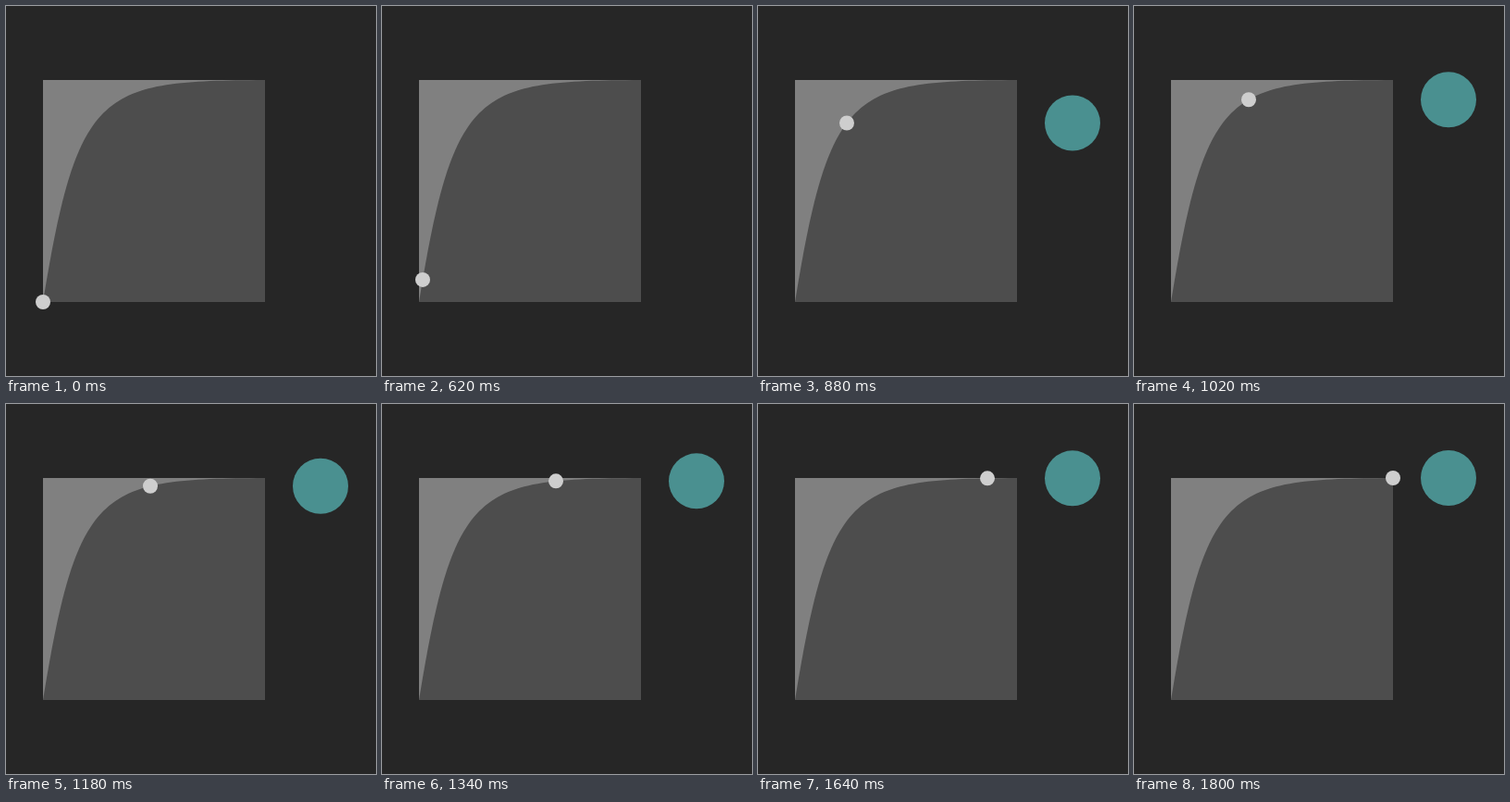
An HTML page with a canvas that plays this animation: 400 by 400 pixels, repeating every 2420 ms.

```html
<!DOCTYPE html>
<html lang="en">
<head>
<meta charset="utf-8">
<title>Ease-out curve</title>
<style>
  html, body { margin: 0; width: 100%; height: 100%; overflow: hidden; background: #262626; }
  canvas { display: block; width: 400px; height: 400px; }
</style>
</head>
<body>
<canvas id="stage" width="400" height="400"></canvas>
<script>
const ctx = document.getElementById('stage').getContext('2d');
const LOOP = 2420, HOLD = 620, TICK = 20, STEPS = 60;
const LEFT = 40, TOP = 80, SIZE = 240;
const curve = { x1: 0.157, y1: 0.97, x2: 0.265, y2: 0.995 };

const px = x => LEFT + x * SIZE;
const py = y => TOP + (1 - y) * SIZE;

function bezier(a, b, s) {
  const u = 1 - s;
  return 3 * s * u * u * a + 3 * s * s * u * b + s * s * s;
}

function ease(x) {
  if (x <= 0 || x >= 1) return x <= 0 ? 0 : 1;
  let lo = 0, hi = 1;
  for (let i = 0; i < 40; i++) {
    const mid = (lo + hi) / 2;
    if (bezier(curve.x1, curve.x2, mid) < x) lo = mid; else hi = mid;
  }
  return bezier(curve.y1, curve.y2, lo);
}

function disc(x, y, r, color) {
  ctx.fillStyle = color;
  ctx.beginPath();
  ctx.arc(x, y, r, 0, Math.PI * 2);
  ctx.fill();
}

function drawPanel() {
  ctx.fillStyle = '#262626';
  ctx.fillRect(0, 0, 400, 400);
  ctx.fillStyle = '#808080';
  ctx.fillRect(LEFT, TOP, SIZE, SIZE);
  ctx.fillStyle = '#4d4d4d';
  ctx.beginPath();
  ctx.moveTo(px(0), py(0));
  ctx.bezierCurveTo(px(curve.x1), py(curve.y1), px(curve.x2), py(curve.y2), px(1), py(1));
  ctx.lineTo(px(1), py(0));
  ctx.fill();
}

function draw(ms) {
  const step = ms < HOLD ? 0 : Math.min(STEPS, Math.floor((ms - HOLD) / TICK) + 1);
  const x = step / STEPS;
  const y = py(ease(x));
  drawPanel();
  disc(px(x), y, 8, '#cecece');
  // The ball shows only once the move is under way.
  if (step > 1) disc(340, y, 30, '#4a9090');
}

const start = performance.now();
function frame() {
  draw((performance.now() - start) % LOOP);
  requestAnimationFrame(frame);
}
frame();
</script>
</body>
</html>
```
